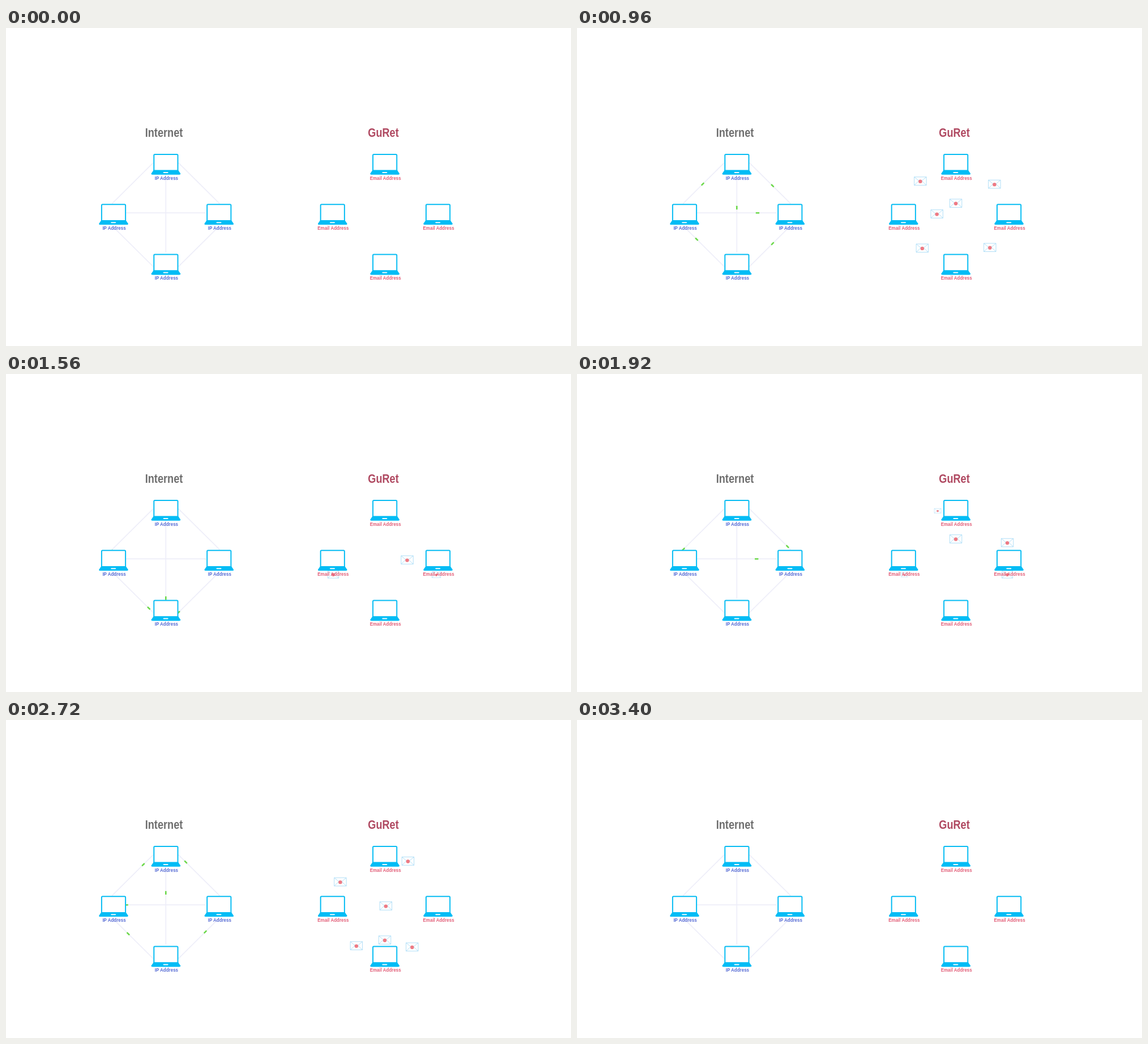
Recreate the animation shown at these times as an HTML page. Size 998 px wide and 561 px high, loop 3480 ms.

```html
<!DOCTYPE html>
<html lang="en">
<head>
<meta charset="utf-8">
<title>Two networks</title>
<style>
  html, body { margin: 0; width: 100%; height: 100%; overflow: hidden; background: #fff; }
  svg { display: block; width: 100vw; height: 100vh; }
  text { font: bold 9.8px "Liberation Sans", Arial, sans-serif; text-anchor: middle; }
  .title { font-size: 22.3px; }
  .link { stroke: #eeeef9; stroke-width: 1.7; }
</style>
</head>
<body>
<svg viewBox="0 0 998 561">
  <defs>
    <g id="laptop">
      <rect x="-21" y="1" width="42.2" height="30" rx="1.6" fill="#fff" stroke="#08bdf3" stroke-width="2"/>
      <path d="M-21.5 28.6H21.7L25.8 34.6Q26.2 36.8 23.6 36.8H-23.4Q-26 36.8 -25.6 34.6Z" fill="#00bcf5"/>
      <rect x="-4.7" y="32" width="9" height="2" rx="1" fill="#e9faff"/>
    </g>
    <g id="packet">
      <rect x="-3.2" y="-1.3" width="6.4" height="2.6" rx=".4" fill="#6cd94a"/>
    </g>
    <g id="letter">
      <path d="M-10.7 -7.3H10.7V7.3H-10.7ZL0 1.6L10.7 -7.3M-10.7 7.3L-2.6 -.3M10.7 7.3L2.6 -.3"
            fill="none" stroke="#a3daf6" stroke-width=".85"/>
      <circle cy=".6" r="3.2" fill="#ee7a84"/>
    </g>
  </defs>
  <g id="links"></g>
  <g id="movers"></g>
  <g id="laptops"></g>
  <g id="labels"></g>
</svg>
<script>
const LOOP = 3480, STEP = 40, POP = 120, TRIP = 1070;
const NARROW = 0.815;
const TOP = 310.3, MIDDLE = 329.3;

// laptops around the hub: top, right, bottom, left
const nodes = {
  T: { x: 0, y: -88.3 },
  R: { x: 93.9, y: 0 },
  B: { x: 0, y: 88.3 },
  L: { x: -92.4, y: 0 }
};

// near and side: where slanted routes meet the upright and the outer laptops
// routes: nodes visited, then the times of leaving and of turning back
const nets = [
  {
    title: "Internet", tint: "#6f6f6f", titleX: 279, label: "IP Address", ink: "#566bd4",
    kind: "packet", x: 282.3, cross: 326.2, reach: 70, lean: 0, sink: 0, lines: true,
    near: { x: 22.3, y: 91.5 }, side: { x: 95, y: 19.5 },
    routes: [["TL", 401, 1909], ["TR", 360, 1840], ["TB", 495, 2022],
             ["LR", 145, 1652], ["LB", 605, 2070], ["RB", 491, 2022]]
  },
  {
    title: "GuRet", tint: "#b04a62", titleX: 666.5, label: "Email Address", ink: "#e25f79",
    kind: "letter", x: 669.1, cross: 328, reach: 65, lean: 4, sink: 2.5, lines: false,
    near: { x: 32, y: 89 }, side: { x: 95, y: 24 },
    routes: [["LT", 380, 1975], ["TR", 380, 1792], ["BT", 270, 1690],
             ["LR", 700, 2200], ["BL", 466, 1980], ["BR", 448, 1945]]
  }
];

const $ = id => document.getElementById(id);
const clamp = v => Math.min(1, Math.max(0, v));
const smooth = v => v * v * (3 - 2 * v);

function add(parent, tag, attrs, text = "") {
  const el = document.createElementNS("http://www.w3.org/2000/svg", tag);
  for (const key in attrs) el.setAttribute(key, attrs[key]);
  el.textContent = text;
  return parent.appendChild(el);
}

function write(text, x, y, fill, style = "") {
  add($("labels"), "text", { transform: `translate(${x} ${y}) scale(${NARROW} 1)`, fill, class: style }, text);
}

// point beside laptop a where the route to laptop b ends
function port(net, a, b) {
  const sx = Math.sign(a.x + b.x), sy = Math.sign(a.y + b.y);
  if (Math.abs(a.x - b.x) < 1 || Math.abs(a.y - b.y) < 1)
    return { x: net.x + Math.sign(a.x) * net.reach, y: net.cross + Math.sign(a.y) * net.reach };
  return a.x
    ? { x: net.x + sx * (net.side.x - net.lean * sy), y: MIDDLE + sy * net.side.y }
    : { x: net.x + sx * net.near.x, y: MIDDLE + sy * net.near.y };
}

function makeMover(net, [ends, leave, back]) {
  const [a, b] = [...ends].map(key => nodes[key]);
  const p = port(net, a, b), q = port(net, b, a);
  const dx = q.x - p.x, dy = q.y - p.y;
  if (net.lines) add($("links"), "line", { class: "link", x1: p.x, y1: p.y, x2: q.x, y2: q.y });
  const turn = net.lines ? Math.atan2(dy, dx) * 180 / Math.PI : 0;
  const el = add($("movers"), "use", { href: "#" + net.kind });
  return { el, p, dx, dy, turn, leave, back, sink: net.sink };
}

function place(m, t) {
  const homeward = t > (m.leave + TRIP + m.back) / 2;
  const age = t - (homeward ? m.back : m.leave);
  const u = clamp(age / TRIP);
  const k = homeward ? 1 - u : u;
  // grow before leaving, shrink after arriving
  const s = smooth(clamp(Math.min(age + POP, TRIP + POP - age) / POP));
  const x = m.p.x + m.dx * k, y = m.p.y + m.dy * k + m.sink * (1 - s);
  m.el.setAttribute("visibility", s > 0 ? "visible" : "hidden");
  m.el.setAttribute("transform", `translate(${x} ${y}) rotate(${m.turn}) scale(${s})`);
}

for (const net of nets) {
  write(net.title, net.titleX, 192.4, net.tint, "title");
  for (const { x, y } of Object.values(nodes)) {
    add($("laptops"), "use", { href: "#laptop", x: net.x + x, y: TOP + y });
    write(net.label, net.x + x + 1.1, TOP + y + 45.5, net.ink);
  }
}
const movers = nets.flatMap(net => net.routes.map(route => makeMover(net, route)));

const begin = performance.now();
function draw() {
  const t = Math.floor((performance.now() - begin) % LOOP / STEP) * STEP;
  for (const m of movers) place(m, t);
  requestAnimationFrame(draw);
}
draw();
</script>
</body>
</html>
```
